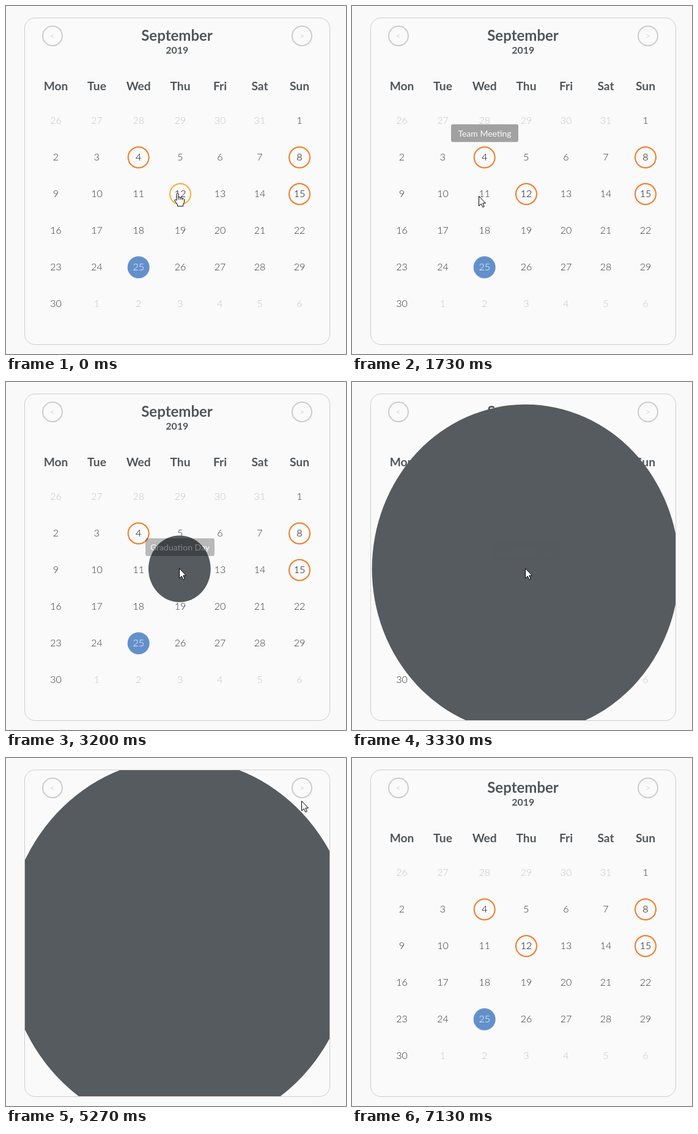
Animation, 556 px wide and 570 px high, one loop 7790 ms. Source, as an HTML page:

```html
<!DOCTYPE html>
<html lang="en">
<head>
<meta charset="utf-8">
<title>Event calendar</title>
<style>
  html, body { margin: 0; width: 100%; height: 100%; overflow: hidden; background: #f9f9f9; }
  body { position: relative; cursor: default; font-family: Lato, sans-serif; }
  svg { position: absolute; left: 0; top: 0; display: block; }
  text { font-family: Lato, sans-serif; text-anchor: middle; fill: #50565a; }
  .bold { font-weight: 700; }
  .thin { font-weight: 300; }
  .day { font-size: 16px; fill: #333; }
  .out { fill: #c4c4c4; }
  .event { fill: #000; }
  .today, .light { fill: #fff; }
  .ring { fill: none; stroke: #f27a26; stroke-width: 2; }
  .ring.hover { stroke: #f9ac38; }
  .disc { fill: #6390cb; }
  .disc.hover { fill: #82abe0; }
  .nav circle { fill: none; stroke: #ccc; stroke-width: 2; }
  .nav text { font-size: 14px; fill: #bbb; }
  .tip {
    position: absolute; height: 29px; line-height: 30px; border-radius: 3px;
    background: #000; color: #fff; font-size: 14px; text-align: center;
    white-space: nowrap; opacity: 0;
  }
  #tip12 { left: 228px; top: 252px; width: 113px; }
  #tip4 { left: 162px; top: 192px; width: 110px; }
  #pointer path { stroke: #000; stroke-linejoin: round; fill: #fff; }
</style>
</head>
<body>
<svg width="556" height="570" viewBox="0 0 556 570">
  <defs>
    <clipPath id="card"><rect x="31" y="20" width="498" height="534" rx="16"/></clipPath>
  </defs>
  <rect x="30.5" y="19.5" width="499" height="535" rx="17" fill="#fafafa" stroke="#ccc"/>
  <g class="nav">
    <circle cx="76" cy="49" r="16"/><text class="thin" x="75.5" y="54">&lt;</text>
    <circle cx="484" cy="49" r="16"/><text class="thin" x="484" y="54">&gt;</text>
  </g>
  <text class="bold" x="279.5" y="57" font-size="24">September</text>
  <text class="bold" x="279.7" y="78" font-size="16">2019</text>
  <g id="grid"></g>
  <g clip-path="url(#card)">
    <ellipse id="modal" cx="283.8" cy="306" fill="#555b5f"/>
  </g>
  <g id="details">
    <text class="thin light" x="279.5" y="213" font-size="19.2">2019-09-12</text>
    <text class="bold light" x="279.3" y="259" font-size="24">Graduation Day</text>
    <path d="M469.5 57L493 80.5M493 57L469.5 80.5" stroke="#888d90" stroke-width="2"/>
  </g>
</svg>
<div class="tip" id="tip12">Graduation Day</div>
<div class="tip" id="tip4">Team Meeting</div>
<svg width="556" height="570" viewBox="0 0 556 570">
  <g id="pointer">
    <path id="arrow" d="M.5 .5V16.5L4.2 13L6.8 18.6L9.2 17.5L6.7 12H11.5Z"/>
    <g id="hand">
      <path d="M-2 1.5Q-.5 -.5 1 1.5V7.5Q2.5 6 4 7.5V8.5Q5.5 7 7 8.5V9.5Q9 8.5 10.5 10.5V15.5L8.5 19.5V22H-.5V19.5L-5 13Q-5 10 -2.5 11.5L-2 12.5Z"/>
      <path d="M1 7.5V11M4 8.5V11.5M7 9.5V12" style="fill:none"/>
    </g>
  </g>
</svg>
<script>
const LOOP = 7790;
const NS = 'http://www.w3.org/2000/svg';
const $ = id => document.getElementById(id);
const show = (el, on) => { el.style.display = on ? '' : 'none'; };

function add(tag, attrs, text = '') {
  const el = document.createElementNS(NS, tag);
  for (const name in attrs) el.setAttribute(name, attrs[name]);
  el.textContent = text;
  return $('grid').appendChild(el);
}

// Calendar grid
const columns = [81.5, 148.5, 216.7, 285, 350, 415, 480];
const events = [4, 8, 12, 15];
const spots = [];

['Mon', 'Tue', 'Wed', 'Thu', 'Fri', 'Sat', 'Sun'].forEach((name, i) =>
  add('text', { class: 'bold', x: columns[i], y: 138, 'font-size': 19.2 }, name));

for (let i = 0; i < 42; i++) {
  const date = new Date(2019, 7, 26 + i);
  const day = date.getDate();
  const x = columns[i % 7];
  const y = 188 + 60 * Math.floor(i / 7);
  const inside = date.getMonth() === 8;
  let kind = inside ? '' : 'out';
  if (inside && events.includes(day)) {
    kind = 'event';
    spots.push({ x, y, el: add('circle', { class: 'ring', cx: x, cy: y, r: 17 }) });
  } else if (inside && day === 25) {
    kind = 'today';
    spots.push({ x, y, el: add('circle', { class: 'disc', cx: x, cy: y, r: 18 }) });
  }
  add('text', { class: `thin day ${kind}`, x, y: y + 5 }, day);
}

// Tracks: [time, value, ...]
const path = [
  [0, 281, 306], [70, 281, 306], [200, 282, 307], [570, 282, 307],
  [670, 262, 294], [800, 212, 259], [870, 201, 253], [1070, 201, 253],
  [1270, 206, 257], [1640, 206, 257], [1730, 207, 310], [1830, 209, 390],
  [1930, 211, 420], [2230, 211, 420], [2330, 233, 380], [2430, 266, 322],
  [2530, 281, 295], [2730, 281, 302], [2810, 281, 302], [2870, 283, 305],
  [3630, 283, 305], [3930, 379, 209], [4270, 463, 92], [4400, 480, 70],
  [4470, 483, 70], [5760, 483, 70], [5870, 440, 110], [6030, 335, 205],
  [6130, 247, 300], [6270, 206, 393], [6500, 206, 393], [6670, 291, 332],
  [6930, 87, 430], [7120, 120, 572]
];
const modalScale = [
  [3100, 0], [3130, .09], [3200, .2], [3270, .5], [3330, 1], [3400, 1.6],
  [5235, 1.6], [5270, 1.15], [5330, .6], [5400, .245], [5470, .1], [5525, 0]
];

function sample(track, t) {
  const next = track.findIndex(key => key[0] > t);
  if (next === 0) return track[0].slice(1);
  if (next < 0) return track[track.length - 1].slice(1);
  const a = track[next - 1], b = track[next];
  const k = (t - a[0]) / (b[0] - a[0]);
  return a.slice(1).map((v, i) => v + (b[i + 1] - v) * k);
}

// Opacity, drop and reveal radius between entering and leaving
const tipTrack = (enter, leave) => [
  [enter, 0, 10, 7], [enter + 160, .325, .3, 51], [enter + 330, .43, 0, 70],
  [leave, .43, 0, 70], [leave + 225, 0, 10, 70]
];
const tips = [
  { el: $('tip12'), tracks: [tipTrack(60, 610), tipTrack(2370, 3110)] },
  { el: $('tip4'), tracks: [tipTrack(1060, 1690)] }
];

function drawTip({ el, tracks }, t) {
  const track = tracks.find(keys => t < keys[keys.length - 1][0]) || tracks[0];
  const [opacity, drop, r] = sample(track, t);
  el.style.opacity = opacity;
  el.style.transform = `translateY(${drop}px)`;
  el.style.clipPath = `ellipse(${r}px ${r * 1.2}px at 50% 100%)`;
}

function draw(t) {
  const [x, y] = sample(path, t);
  const [scale] = sample(modalScale, t);
  const detailed = t >= 3665 && t < 4995;
  $('modal').setAttribute('rx', 249 * scale);
  $('modal').setAttribute('ry', 267 * scale);
  show($('details'), detailed);

  let hot = detailed && x > 468 && x < 495 && y > 55 && y < 82;
  for (const spot of spots) {
    const over = scale === 0 && Math.hypot(x - spot.x, y - spot.y) <= 18;
    spot.el.classList.toggle('hover', over);
    hot = hot || over;
  }
  tips.forEach(tip => drawTip(tip, t));

  $('pointer').setAttribute('transform', `translate(${Math.round(x)} ${Math.round(y)})`);
  show($('pointer'), t < 7120);
  show($('hand'), hot);
  show($('arrow'), !hot);
}

const start = performance.now();
function tick() {
  draw((performance.now() - start) % LOOP);
  requestAnimationFrame(tick);
}
tick();
</script>
</body>
</html>
```
